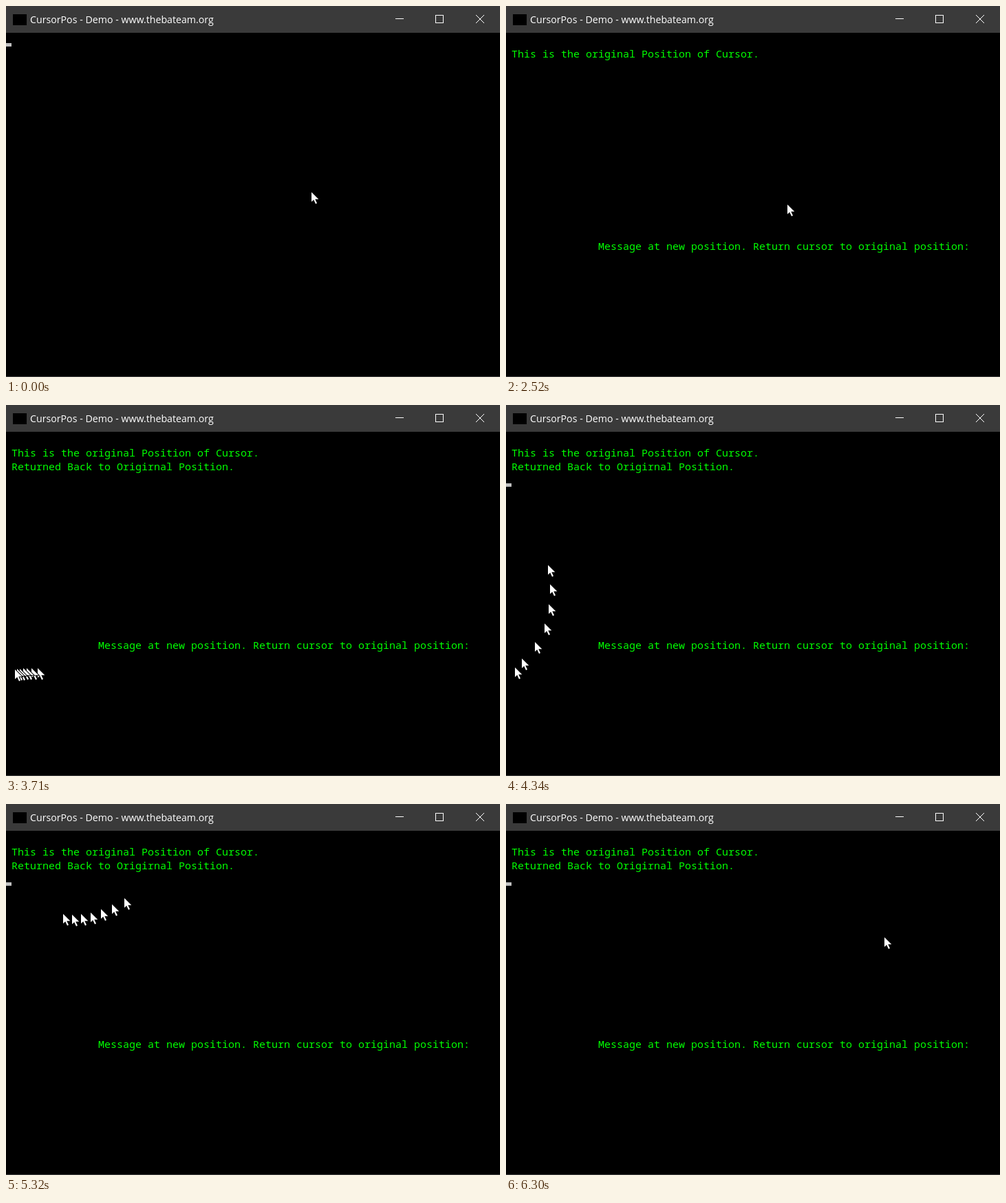
An HTML page with a canvas that plays this animation: 718 by 540 pixels, repeating every 6370 ms.

```html
<!DOCTYPE html>
<html lang="en">
<head>
<meta charset="utf-8">
<title>CursorPos - Demo</title>
<style>
  html, body { margin: 0; width: 100%; height: 100%; overflow: hidden; background: #000; }
  canvas { display: block; }
</style>
</head>
<body>
<canvas id="stage" width="718" height="540"></canvas>
<script>
const ctx = document.getElementById('stage').getContext('2d');
const LOOP = 6370, TICK = 70, TRAIL_STEP = 35, TRAIL = 7;
const MOVE_START = 2520, RETURN_AT = 3570, BLINK_START = 3090, BLINK = 530;

// Key points of the mouse path (time, x, y), joined by a smooth spline
const keys = [
  [2520, 409, 289], [2800, 225, 306], [3010, 190, 325], [3080, 211, 356],
  [3150, 209, 374], [3220, 163, 384], [3570, 30, 383], [4130, 13, 382],
  [4235, 56, 318], [4340, 61, 233], [4550, 12, 95], [4690, 12, 87],
  [4900, 10, 98], [5075, 70, 156], [5250, 138, 153], [5460, 240, 99],
  [5565, 272, 103], [5670, 298, 105], [5950, 486, 120], [6090, 550, 194]
];

const arrow = new Path2D('M0 0V14L3.2 11L6 17L8 16L5.3 10.3H10.3Z');

const clamp = (v, lo, hi) => Math.max(lo, Math.min(hi, v));
const keyAt = i => keys[clamp(i, 0, keys.length - 1)];

function slope(i, axis) {
  const a = keyAt(i - 1), b = keyAt(i + 1);
  return (b[axis] - a[axis]) / (b[0] - a[0]);
}

function mouseAt(time) {
  const t = clamp(time, keys[0][0], keys[keys.length - 1][0]);
  const i = Math.max(1, keys.findIndex(k => k[0] >= t));
  const a = keys[i - 1], b = keys[i];
  const span = b[0] - a[0], u = (t - a[0]) / span, v = 1 - u;
  return [1, 2].map(axis => Math.round(
    a[axis] * v * v * (1 + 2 * u) + b[axis] * u * u * (3 - 2 * u) +
    span * u * v * (slope(i - 1, axis) * v - slope(i, axis) * u)));
}

function rect(color, x, y, w, h) {
  ctx.fillStyle = color;
  ctx.fillRect(x, y, w, h);
}

function text(str, x, y, color, font) {
  ctx.fillStyle = color;
  ctx.font = font;
  ctx.fillText(str, x, y);
}

function print(str, x, y) {
  text(str, x, y, '#00ff00', '15px "Noto Sans Mono", monospace');
}

function drawPointer([x, y]) {
  ctx.save();
  ctx.translate(x, y);
  ctx.strokeStyle = '#000';
  ctx.lineWidth = 2;
  ctx.stroke(arrow);
  ctx.fillStyle = '#fff';
  ctx.fill(arrow);
  ctx.restore();
}

function drawWindow() {
  rect('#000', 0, 0, 718, 540);
  rect('#3a3a3a', 0, 0, 718, 39);
  rect('#3a3a3a', 0, 539, 718, 1);
  rect('#000', 10, 12, 20, 16);
  text('CursorPos - Demo - www.thebateam.org', 35, 25, '#fff', '14.2px "Open Sans", sans-serif');
  rect('#fff', 566, 18, 12, 1);
  ctx.strokeStyle = '#fff';
  ctx.lineWidth = 1;
  ctx.strokeRect(624.5, 13.5, 11, 11);
  ctx.stroke(new Path2D('M683 13L695 25M695 13L683 25'));
}

function caretOn(t) {
  if (t >= BLINK_START) return Math.floor((t - BLINK_START) / BLINK) % 2 === 0;
  return t < 200 || (t >= 600 && t < 800) || (t >= 1530 && t < 1990);
}

function draw(t) {
  if (t >= MOVE_START) t -= (t - MOVE_START) % TICK;
  drawWindow();
  if (t >= 800) print('This is the original Position of Cursor.', 8, 75);
  if (t >= 1990) print('Message at new position. Return cursor to original position:', 134, 355);
  if (t >= RETURN_AT) print('Returned Back to Origirnal Position.', 8, 95);

  const caretY = t < 800 ? 54 : t < 1990 ? 94 : t < RETURN_AT ? 374 : 114;
  if (caretOn(t)) rect('#c0c0c0', 0, caretY, 8, 5);

  if (t < MOVE_START) drawPointer([444, 271]);
  else for (let i = TRAIL - 1; i >= 0; i--) drawPointer(mouseAt(t - i * TRAIL_STEP));
}

const start = performance.now();
function loop() {
  draw((performance.now() - start) % LOOP);
  requestAnimationFrame(loop);
}
loop();
</script>
</body>
</html>
```
